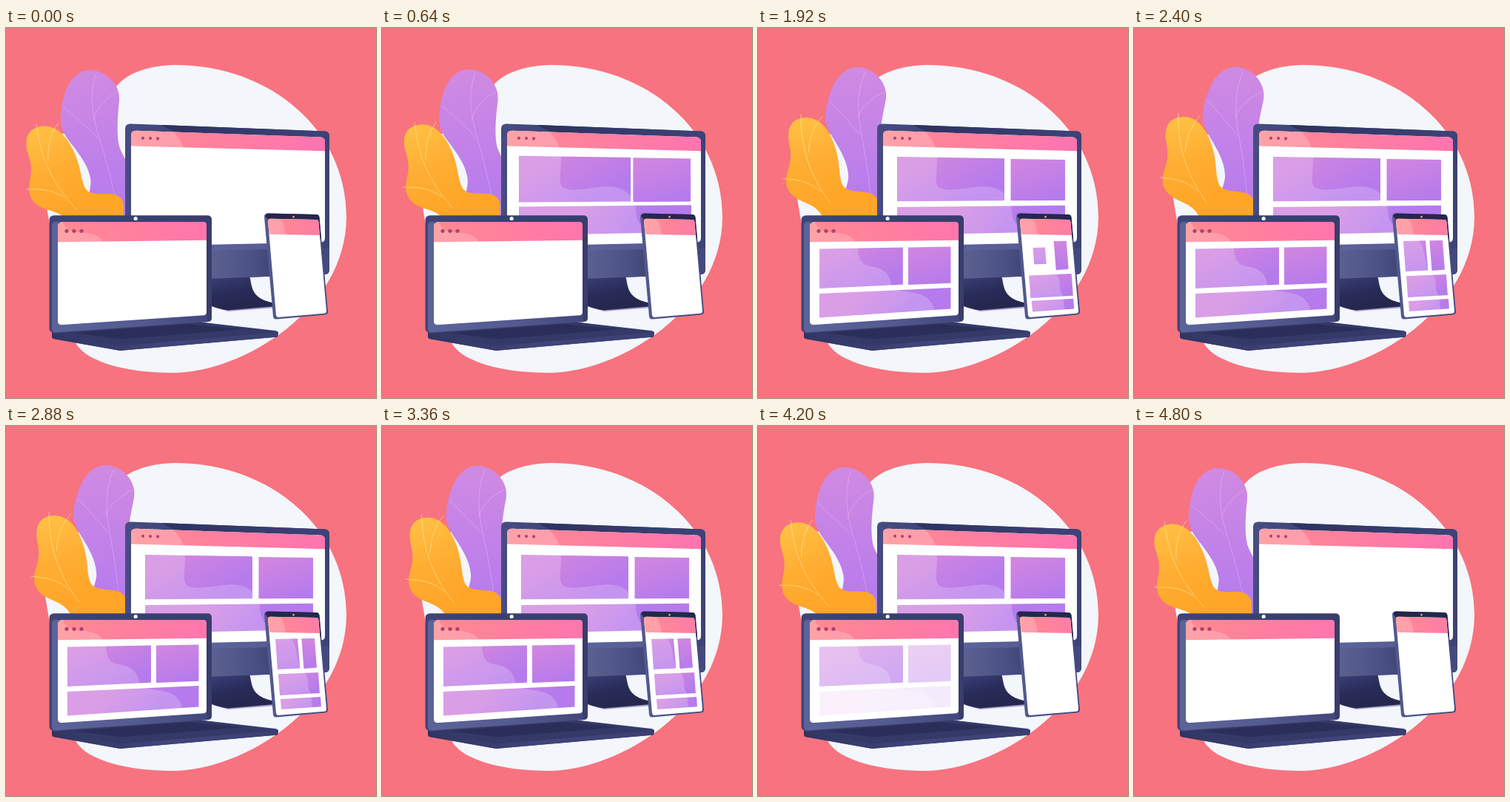
These frames come from a looping animation (500 by 500 pixels, 4.84 s). An HTML page with a canvas:

```html
<!DOCTYPE html>
<html lang="en">
<head>
<meta charset="utf-8">
<title>Responsive screens</title>
<style>
  html, body { margin: 0; width: 100%; height: 100%; overflow: hidden; background: #f7737f; }
  canvas { display: block; width: 100vw; height: 100vh; }
</style>
</head>
<body>
<canvas id="stage" width="500" height="500"></canvas>
<script>
const ctx = document.getElementById('stage').getContext('2d');
const LOOP = 4840;

const path = d => new Path2D(d);

function gradient(x0, y0, x1, y1, ...colors) {
  const g = ctx.createLinearGradient(x0, y0, x1, y1);
  colors.forEach((c, i) => g.addColorStop(i / (colors.length - 1), c));
  return g;
}

function fill(shape, color) {
  ctx.fillStyle = color;
  ctx.fill(typeof shape === 'string' ? path(shape) : shape);
}

function stroke(d, color, width) {
  ctx.strokeStyle = color;
  ctx.lineWidth = width;
  ctx.stroke(path(d));
}

function dot(x, y, r, color) {
  ctx.fillStyle = color;
  ctx.beginPath();
  ctx.arc(x, y, r, 0, Math.PI * 2);
  ctx.fill();
}

// A panel is a quad given clockwise from its top left corner.
function panel(...p) {
  const xs = p.filter((_, i) => i % 2 === 0);
  const ys = p.filter((_, i) => i % 2 === 1);
  const mean = a => a.reduce((s, v) => s + v) / a.length;
  return {
    shape: path(`M${p[0]},${p[1]} L${p.slice(2).join(' ')}Z`),
    cx: mean(xs), cy: mean(ys),
    left: Math.min(...xs), right: Math.max(...xs),
    top: Math.min(...ys), bottom: Math.max(...ys)
  };
}

const blob = path(`M228,50 C190,51 160,62 147,82 C139,100 142,125 122,140
  C106,147 90,142 75,143 C56,150 49,200 53,230 C57,255 64,290 68,340 L95,427
  C110,452 165,466 225,466 C320,466 460,380 460,255 C460,140 360,50 228,50Z`);

const purpleLeaf = path(`M113,57 C137,57 155,78 153,98 C151,118 149,142 153,160
  C157,172 164,180 170,195 L178,262 L110,262 C107,235 117,215 114,203
  C111,186 100,172 91,160 C82,148 74,140 74,122 C75,96 83,58 113,57Z`);

const yellowLeaf = path(`M51,132.500 C72,132 86,152 94,172 C102,192 101,206 108,218
  C116,228 134,222 147,225 C156,228 160,234 159,246 L160,275 L92,275
  C82,248 62,249 49,243 C34,236 29,224 32,208 C36,190 34,184 30,170
  C24,152 28,134 51,132.500Z`);

// inTime and outTime belong to the first panel; later ones in the list lead it.
const monitor = {
  inTime: 405, outTime: 4400,
  screen: path('M169,145 Q169,138.500 176,138.700 L425,147.500 Q431,148 431,154 L431,284 Q431,289 426,289.500 L169,295Z'),
  header: path('M165,130 L435,140 L435,166.300 L165,159.400Z'),
  headerColor: () => gradient(169, 150, 431, 158, '#ff8a90', '#ff7fa0', '#ff74b0'),
  shine: path(`M161,129 L210,131 C230,139 236,152 240,162 C246,182 236,206 244,215
    C256,225 292,211 315,215 C332,219 342,230 343,245 C344,262 350,270 366,276 L366,292 L161,296Z`),
  panels: [
    panel(188, 174, 333, 176.3, 333, 233.3, 188, 234.3),
    panel(341.5, 177, 415, 178, 415, 233, 341.5, 233.3),
    panel(188, 242, 415, 239.7, 415, 275, 188, 280)
  ]
};

const laptop = {
  inTime: 1125, outTime: 4060,
  screen: path('M70,269 Q70,262 77,262 L266,262 Q271,262 271,267 L271,384 Q271,388 267,388.300 L76,401 Q70,401.500 70,396Z'),
  header: path('M60,255 L275,255 L275,286.800 L60,289.500Z'),
  headerColor: () => gradient(70, 280, 271, 270, '#ff8a90', '#ff7f9e', '#ff76ad'),
  shine: path(`M60,253 L76,260 C83,279 95,275 108,277 C123,279 132,285 135,297
    C136,313 140,320 152,322 C172,325 178,334 180,346 C184,358 205,355 220,360
    C233,366 237,374 239,383 L239,402 L60,410Z`),
  panels: [
    panel(83, 298.5, 196, 296.5, 196, 346.7, 83, 352),
    panel(203, 296.4, 260.5, 295.5, 260.5, 344.8, 203, 347),
    panel(83, 359, 260.5, 351, 260.5, 379.5, 83, 391.5)
  ]
};

const phone = {
  inTime: 1845, outTime: 3720,
  screen: path('M354,261 Q354,257.800 357,257.800 L419,259 Q422,259 422.400,262 L433,382 Q433.300,385.500 430,385.800 L369,390.800 Q365.500,391 365,388Z'),
  header: path('M352,255 L425,256 L426,280 L352,278.800Z'),
  headerColor: () => gradient(354, 265, 424, 272, '#ff8a90', '#ff7da6'),
  shine: path(`M352,255 L369,255 C378,265 375,275 380,282 C397,296 390,316 400,330
    C413,340 404,350 412,362 L416,392 L352,392Z`),
  panels: [
    panel(364, 288, 394, 287.3, 397.3, 327.5, 367, 329),
    panel(399.3, 287.3, 417, 287, 420, 326.5, 402.5, 328),
    panel(368, 335.3, 422, 333, 424, 361, 370, 364),
    panel(371, 369, 425, 366, 426, 379.3, 372, 383)
  ]
};

function popScale(ms) {
  if (ms <= 0) return 0;
  return 1 - Math.exp(-ms / 125) * Math.cos(ms * Math.PI / 400);
}

function drawPanel(p, scale, alpha) {
  if (scale <= 0 || alpha <= 0) return;
  ctx.save();
  ctx.globalAlpha = alpha;
  ctx.translate(p.cx, p.cy);
  ctx.scale(scale, scale);
  ctx.translate(-p.cx, -p.cy);
  const slant = (p.right - p.left) * 0.12;
  fill(p.shape, gradient(p.cx - slant, p.top, p.cx + slant, p.bottom, '#d085e0', '#b57bec'));
  ctx.restore();
}

function drawScreen(device, t) {
  ctx.save();
  fill(device.screen, '#fff');
  ctx.clip(device.screen);
  fill(device.header, device.headerColor());
  device.panels.forEach((p, i) => {
    const scale = popScale(t - device.inTime + i * 105);
    const gone = (t - device.outTime + i * 100) / 400;
    drawPanel(p, scale, 1 - Math.min(1, Math.max(0, gone)));
  });
  fill(device.shine, 'rgba(255,255,255,.2)');
  ctx.restore();
}

function drawLeaves(t) {
  const sway = (1 - Math.cos(2 * Math.PI * t / LOOP)) / 2;
  ctx.save();
  ctx.translate(160, 272);
  ctx.rotate(0.125 * sway);
  ctx.translate(-160, -272);
  fill(purpleLeaf, gradient(105, 60, 135, 225, '#d08ae2', '#b87cec'));
  stroke(`M121,62 C112,95 117,120 128,155 Q139,190 149,236
    M150,86 C133,96 120,112 118,126 M77,106 Q100,125 124,148`, 'rgba(255,235,255,.32)', 0.8);
  fill(yellowLeaf, gradient(40, 135, 90, 245, '#ffc044', '#ffae33', '#ffa527'));
  stroke(`M41,129 C46,170 58,205 95,245 M71,128 C60,143 56,160 57,180
    M27,218 C50,217 65,219 80,230`, 'rgba(255,240,170,.6)', 0.9);
  ctx.restore();
}

function drawMonitor(t) {
  // stand
  fill('M270,374 L300,383 L364,378 L364,374 L270,370Z', '#a8a3cd');
  fill('M270,336 L329,334 C333,350 330,366 364,372 L364,376 L300,381.500 Q285,380 270,372Z',
    gradient(290, 338, 300, 380, '#363b72', '#292c58', '#25274e'));
  // body
  fill('M161,136 Q161,129.500 168,129.500 L210,131 L431,139.500 Q437,140 437,146 L437,327 Q437,332.500 431,333 L161,343Z',
    gradient(161, 0, 437, 0, '#474d82', '#3b4074', '#343967', '#3d4277'));
  fill('M210,131 L431,139.500 Q436,140 437,145 L431,148 L228,140.500Z',
    gradient(210, 0, 437, 0, '#2d315f', '#3e4378'));
  fill('M161,293 L431,288 L437,284 L437,298 L161,304Z',
    gradient(270, 0, 437, 0, '#5c649c', '#565d94', '#3c4175'));
  fill('M161,303 L437,297.500 L437,327 Q437,332.500 431,333 L161,343Z',
    gradient(278, 0, 437, 0, '#5a618f', '#4c5286', '#363a68', '#454a80'));
  drawScreen(monitor, t);
  [185, 195, 205].forEach((x, i) => dot(x, 148.8 + i * 0.3, 2.1, '#a8486f'));
}

function drawLaptop(t) {
  // base
  fill('M62,410 L250,396 L364,409 Q368,410 368,412 L367,417.500 L154,436 L64,420 Q62,419 62,417Z', '#3b4075');
  fill('M62,410 L250,396 L368,411 L153,430 L62,413Z', '#343968');
  fill('M92,412 L245,400 L320,407 L155,420.500Z', '#2b2e59');
  fill('M62,413 L153,430 L368,411 L367,417.500 L154,436 L64,420 Q62,419 62,417Z',
    gradient(62, 0, 368, 0, '#30345f', '#40457a', '#3b4073'));
  // lid
  fill('M58.500,260 Q58.500,253.300 65,253.300 L272,253.300 Q278,253.300 278,259 L278,392 Q278,396.500 273,397 L65,412 Q58.500,411 58.500,406Z',
    gradient(58, 0, 278, 0, '#3f4477', '#3b3f70', '#393d6c'));
  fill('M62,266 Q63,260 71,262 L72,395 L271,387 L273,397 L66,411.500 Q62,411 62,406Z',
    gradient(62, 0, 275, 0, '#5c6399', '#555c91', '#42477b'));
  drawScreen(laptop, t);
  dot(175.2, 257.5, 2.6, '#fff');
  [82, 92, 102].forEach(x => dot(x, 274.3, 2.6, '#a8486f'));
}

function drawPhone(t) {
  fill('M349,255 Q349,250.500 354,250.500 L419,252 Q423,252 423.500,256 L435,383 Q435.300,387 431,387.500 L366,393.500 Q361.500,394 361,390Z',
    gradient(350, 320, 435, 315, '#535a90', '#454a80'));
  fill('M350.500,254 Q351,250.500 355,250.500 L419,252 Q423,252 423.500,256 L426,285 L421,285 L421,260 L354,259Z', '#24274c');
  drawScreen(phone, t);
  dot(388.5, 255.2, 1.4, '#f5a06b');
}

function draw(now) {
  const t = now % LOOP;
  ctx.fillStyle = '#f7737f';
  ctx.fillRect(0, 0, 500, 500);
  fill(blob, '#f3f6fa');
  drawLeaves(t);
  drawMonitor(t);
  drawLaptop(t);
  drawPhone(t);
}

const start = performance.now();
function tick() {
  draw(performance.now() - start);
  requestAnimationFrame(tick);
}
tick();
</script>
</body>
</html>
```
